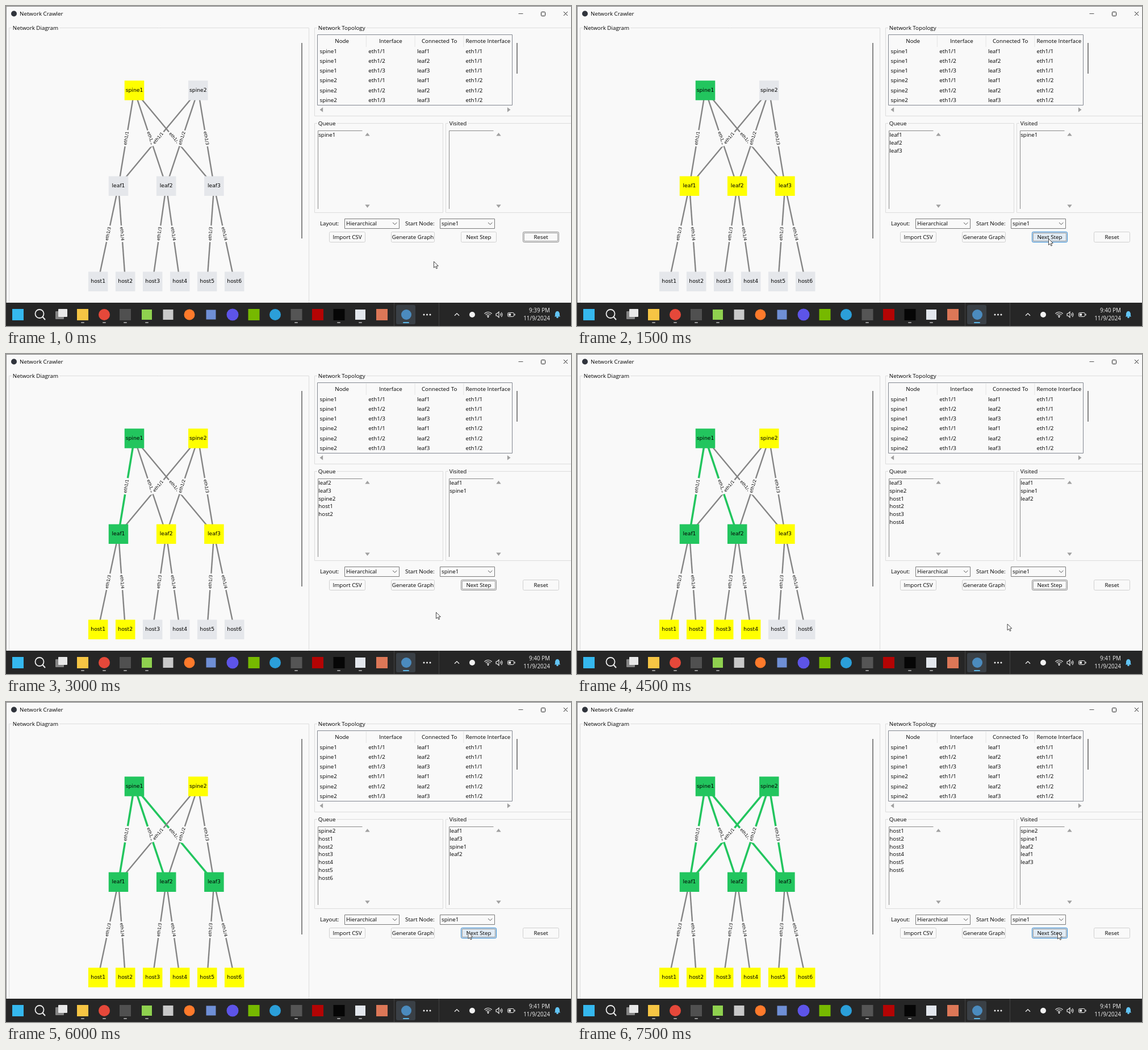
These frames come from a looping animation (995x563 px, 8 s). An HTML page with a canvas:

```html
<!DOCTYPE html>
<html lang="en">
<head>
<meta charset="utf-8">
<title>Network Crawler</title>
<style>
  html, body { margin: 0; width: 100%; height: 100%; overflow: hidden; background: #f9f9f9; }
  canvas { display: block; }
</style>
</head>
<body>
<canvas id="stage" width="995" height="563"></canvas>
<script>
const ctx = document.getElementById('stage').getContext('2d');
const LOOP = 8000, STEP = 1500;
const UI = '"Open Sans", "Noto Sans", sans-serif';
const GRAPH = '"DejaVu Sans", sans-serif';
const SURFACE = '#f9f9f9', INK = '#000';
const GREEN = '#22c55e', YELLOW = '#ffff00', IDLE = '#e5e7eb';
const NODE = 34.5;

// Graph layout, breadth-first order and how many nodes are known after each step.
const nodes = { spine1: [226, 148.6], spine2: [338.3, 148.6] };
for (let i = 0; i < 3; i++) nodes['leaf' + (i + 1)] = [198 + 84.2 * i, 316.7];
for (let i = 0; i < 6; i++) nodes['host' + (i + 1)] = [162.2 + 48 * i, 484.8];

const links = [];
for (const spine of [1, 2])
  for (const leaf of [1, 2, 3]) links.push(['spine' + spine, 'leaf' + leaf, 'eth1/' + leaf]);
for (let h = 1; h <= 6; h++)
  links.push(['leaf' + Math.ceil(h / 2), 'host' + h, 'eth1/' + (h % 2 ? 3 : 4)]);

const order = ['spine1', 'leaf1', 'leaf2', 'leaf3', 'spine2',
  'host1', 'host2', 'host3', 'host4', 'host5', 'host6'];
const known = [1, 4, 7, 9, 11, 11];

const steps = [
  { clock: '9:39 PM', cursor: [753, 449], visited: [] },
  { clock: '9:40 PM', cursor: [830, 409], visited: ['spine1'], hover: true },
  { clock: '9:40 PM', cursor: [757, 454], visited: ['leaf1', 'spine1'] },
  { clock: '9:41 PM', cursor: [757.5, 474.5], visited: ['leaf1', 'spine1', 'leaf2'] },
  { clock: '9:41 PM', cursor: [813.5, 405], visited: ['leaf1', 'leaf3', 'spine1', 'leaf2'], hover: true },
  { clock: '9:41 PM', cursor: [846, 405.5], visited: ['spine2', 'spine1', 'leaf2', 'leaf1', 'leaf3'], hover: true }
];

function text(str, x, y, { size = 9.8, family = UI, align = 'left', color = INK } = {}) {
  ctx.font = `${size}px ${family}`;
  ctx.textAlign = align;
  ctx.fillStyle = color;
  ctx.fillText(str, x, y);
}

function box(x, y, w, h, fill, stroke, radius = 0) {
  ctx.beginPath();
  ctx.roundRect(x, y, w, h, radius);
  if (fill) { ctx.fillStyle = fill; ctx.fill(); }
  if (stroke) { ctx.strokeStyle = stroke; ctx.lineWidth = 1; ctx.stroke(); }
}

function disc(x, y, r, fill) {
  ctx.beginPath();
  ctx.arc(x, y, r, 0, 2 * Math.PI);
  ctx.fillStyle = fill;
  ctx.fill();
}

function line(points, color, width = 1) {
  ctx.beginPath();
  points.forEach(([x, y]) => ctx.lineTo(x, y));
  ctx.strokeStyle = color;
  ctx.lineWidth = width;
  ctx.stroke();
}

function polygon(points, fill) {
  ctx.beginPath();
  points.forEach(([x, y]) => ctx.lineTo(x, y));
  ctx.closePath();
  ctx.fillStyle = fill;
  ctx.fill();
}

function arrow(x, y, turn) {
  ctx.save();
  ctx.translate(x, y);
  ctx.rotate(turn * Math.PI / 2);
  polygon([[0, -3], [4.2, 2.6], [-4.2, 2.6]], '#a0a0a0');
  ctx.restore();
}

function labelFrame(title, x, y, w, h) {
  box(x, y, w, h, null, '#dcdcdc');
  ctx.font = `9.8px ${UI}`;
  box(x + 4.5, y - 4, ctx.measureText(title).width + 4, 8, SURFACE);
  text(title, x + 6.3, y + 3);
}

function drawWindow() {
  box(0, 0, 995, 563, SURFACE);
  box(0, 0, 995, 1, '#777');
  box(0, 0, 1, 522, '#8c8c8c');
  disc(14, 13.5, 5, '#30343c');
  text('Network Crawler', 24, 17);
  line([[902.5, 13.5], [910.5, 13.5]], '#555');
  box(942.5, 10.5, 7, 7, null, '#222', 1);
  line([[982, 10], [989, 17]], '#222');
  line([[989, 10], [982, 17]], '#222');
}

function drawGraph(step) {
  const isVisited = name => order.indexOf(name) < step;
  labelFrame('Network Diagram', 5.5, 38.5, 528, 500);
  box(520, 65, 2, 344, '#868686');

  for (const [a, b] of links) {
    const done = isVisited(a) && isVisited(b);
    line([nodes[a], nodes[b]], done ? GREEN : '#848484', done ? 3.5 : 2.4);
  }
  for (const [a, b, label] of links) {
    const [ax, ay] = nodes[a], [bx, by] = nodes[b];
    ctx.save();
    ctx.translate((ax + bx) / 2, (ay + by) / 2);
    ctx.rotate(Math.atan((by - ay) / (bx - ax)));
    box(-14.6, -6.2, 29.2, 12.4, SURFACE, null, 2);
    text(label, 0, 2.1, { size: 7.5, family: GRAPH, align: 'center' });
    ctx.restore();
  }
  for (const [name, [x, y]] of Object.entries(nodes)) {
    const rank = order.indexOf(name);
    const color = rank < step ? GREEN : rank < known[step] ? YELLOW : IDLE;
    box(x - NODE / 2, y - NODE / 2, NODE, NODE, color);
    text(name, x, y + 2.3, { size: 9.2, family: GRAPH, align: 'center' });
  }
}

function drawTable() {
  labelFrame('Network Topology', 543.5, 38.5, 470, 155);
  box(548.5, 50.5, 343, 124, SURFACE, '#828790');
  ['Node', 'Interface', 'Connected To', 'Remote Interface'].forEach((title, i) => {
    text(title, 591.7 + 85.7 * i, 64.5, { align: 'center' });
    if (i) line([[548.5 + 85.8 * i, 52], [548.5 + 85.8 * i, 72]], '#e3e3e3');
  });
  links.slice(0, 6).forEach(([node, peer, port], row) => {
    const cells = [node, port, peer, 'eth1/' + node.slice(-1)];
    cells.forEach((cell, i) => text(cell, 552.5 + 85.7 * i, 83 + 17.15 * row));
  });
  box(899, 65, 2, 54, '#868686');
  arrow(555.5, 182.5, -1);
  arrow(885.5, 182.5, 1);
}

function drawList(title, x, width, items) {
  labelFrame(title, x, 206.5, width, 157);
  line([[x + 84, 219.5], [x + 6, 219.5], [x + 6, 357]], '#8a8a8a');
  items.forEach((item, i) => text(item, x + 6.7, 230.3 + 13.7 * i));
  arrow(x + 93, 226, 0);
  arrow(x + 93, 352, 2);
}

function comboBox(label, labelX, value, x) {
  text(label, labelX, 386);
  box(x + .5, 374.5, 96, 17, SURFACE, '#7a7a7a');
  text(value, x + 3, 386);
  line([[x + 85, 381], [x + 88.7, 384.5], [x + 92.4, 381]], '#555');
}

function button(label, x, w, focused, hover) {
  const border = hover ? '#2b84cf' : focused ? '#8a8a8a' : '#d0d0d0';
  box(x + .5, 397.5, w, 18, hover ? '#e1ebf4' : SURFACE, border, 2);
  if (focused) {
    ctx.setLineDash([1, 1]);
    box(x + 2.5, 399.5, w - 4, 14, null, '#444');
    ctx.setLineDash([]);
  }
  text(label, x + w / 2 + .5, 410, { align: 'center' });
}

function drawControls(step) {
  comboBox('Layout:', 553, 'Hierarchical', 596);
  comboBox('Start Node:', 703, 'spine1', 764);
  button('Import CSV', 569, 63);
  button('Generate Graph', 678, 76);
  button('Next Step', 801, 62, step > 0, steps[step].hover);
  button('Reset', 910, 63, step === 0);
}

function drawTaskbar(clock) {
  box(0, 522, 995, 41, '#262626');
  box(683, 522, 1, 41, '#414141');
  box(762, 522, 1, 41, '#414141');
  box(687, 526, 34, 34, '#3a4046', null, 3);

  const square = (x, color, size = 20) => box(x - size / 2, 543 - size / 2, size, size, color);
  square(21, '#35b8ee');
  ctx.beginPath();
  ctx.arc(59, 541.5, 7.5, 0, 2 * Math.PI);
  ctx.strokeStyle = '#eee';
  ctx.lineWidth = 1.8;
  ctx.stroke();
  line([[64.5, 547], [69, 552]], '#eee', 2);
  box(87, 537, 15, 14, '#858585', null, 1);
  box(92, 533, 16, 14, '#e8e8e8', null, 1);
  square(135, '#f6c544');
  disc(173, 543, 10, '#e5483a');
  square(210, '#505050');
  square(248, '#8fd14f', 18);
  square(285.5, '#c9c9c9', 18);
  disc(323, 543, 9.5, '#ff7a2b');
  square(361, '#6f8fd6', 17);
  disc(399, 543, 10.5, '#5d54e8');
  square(436.5, '#76b900');
  disc(474, 543, 10, '#2b9fd9');
  square(511.5, '#555');
  square(549, '#b40404');
  square(586.5, '#060606');
  square(624, '#e3e7ed', 18);
  square(662, '#dc7757');
  disc(705, 543, 9, '#4b8bbe');
  for (const x of [135, 173, 210, 248, 511, 586, 624]) box(x - 3, 556, 6, 2, '#9a9a9a', null, 1);
  box(699, 556, 11, 2, '#5cb8e8', null, 1);
  for (const x of [736, 741.5, 747]) disc(x, 543, 1.5, '#eee');
  drawTray(clock);
}

function drawTray(clock) {
  const white = '#f2f2f2';
  line([[790, 544.8], [794, 540.8], [798, 544.8]], white, 1.3);
  disc(821, 543, 5, white);
  for (const r of [3, 6, 9]) {
    ctx.beginPath();
    ctx.arc(849, 547.5, r, -Math.PI * .76, -Math.PI * .24);
    ctx.strokeStyle = white;
    ctx.lineWidth = 1.2;
    ctx.stroke();
  }
  disc(849, 547, 1.3, white);
  line([[863, 541], [865, 541], [868, 538], [868, 548], [865, 545], [863, 545], [863, 541]], white, 1.1);
  for (const r of [2.5, 5]) {
    ctx.beginPath();
    ctx.arc(869, 543, r, -.9, .9);
    ctx.stroke();
  }
  box(883.5, 539.5, 11, 7, null, white, 2);
  box(885, 541, 4, 4, white);
  box(895.5, 541.5, 1.2, 3, white);
  text(clock, 958, 539, { size: 9.9, align: 'right', color: white });
  text('11/9/2024', 958, 552.5, { size: 9.9, align: 'right', color: white });
  polygon([[966, 546.5], [967, 544.5], [967, 541], [968.5, 537.8], [971, 536.8], [973.5, 537.8],
    [975, 541], [975, 544.5], [976, 546.5]], '#62c4f4');
  disc(971, 547.5, 1.8, '#62c4f4');
}

function drawCursor([x, y]) {
  const outline = [[0, 0], [0, 11], [2.6, 8.7], [4.4, 12.6], [6.1, 11.8], [4.4, 8], [7.8, 7.8], [0, 0]]
    .map(([dx, dy]) => [x + .5 + dx, y + .5 + dy]);
  polygon(outline, '#fff');
  line(outline, '#333', .9);
}

function frame() {
  const step = Math.min(Math.floor(performance.now() % LOOP / STEP), steps.length - 1);
  const { clock, cursor, visited } = steps[step];
  drawWindow();
  drawGraph(step);
  drawTable();
  drawList('Queue', 543.5, 226, order.slice(step, known[step]));
  drawList('Visited', 774.5, 240, visited);
  drawControls(step);
  drawTaskbar(clock);
  drawCursor(cursor);
  requestAnimationFrame(frame);
}
frame();
</script>
</body>
</html>
```
